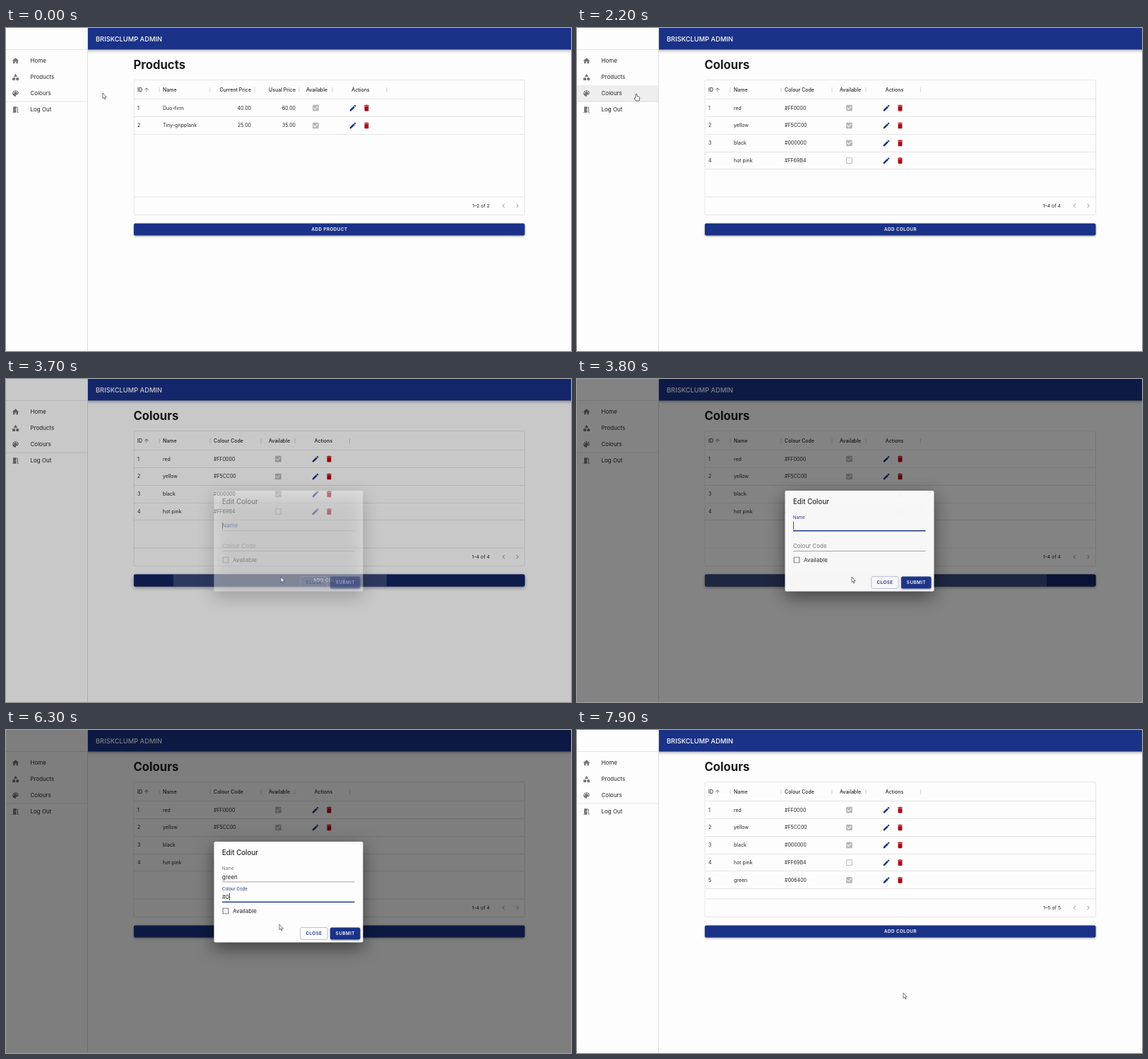
Recreate the animation shown at these times as an HTML page with a canvas. Size 800x457 px, loop 8 s.

```html
<!DOCTYPE html>
<html lang="en">
<head>
<meta charset="utf-8">
<title>Admin panel</title>
<style>
html, body { margin: 0; width: 100%; height: 100%; overflow: hidden; background: #fdfdfe; }
canvas { display: block; }
</style>
</head>
<body>
<canvas id="stage" width="800" height="457"></canvas>
<script>
const ctx = document.getElementById('stage').getContext('2d');
const LOOP = 8000;
const PAPER = '#fdfdfe', BLUE = '#1a3287', NAVY = '#12235f', RED = '#b3000f', INK = '#262626', GREY = '#747474';

const icons = Object.fromEntries(Object.entries({
  home: 'M10 20v-6h4v6h5v-8h3L12 3 2 12h3v8z',
  shapes: 'M12 2l-5.5 9h11zM3 13.5h8v8H3zM17.5 13a4.5 4.5 0 1 0 .01 0z',
  palette: 'M12 3a9 9 0 0 0 0 18c1.4 0 2-1.4 1.1-2.5-.8-1 0-2.5 1.1-2.5H16a5 5 0 0 0 5-5c0-4.4-4-8-9-8z' +
    'M6.5 9a1.5 1.5 0 1 0 .01 0zM9.5 5a1.5 1.5 0 1 0 .01 0zM14.5 5a1.5 1.5 0 1 0 .01 0zM17.5 9a1.5 1.5 0 1 0 .01 0z',
  door: 'M14 6v15H3v-2h2V3h9v1h5v15h2v2h-4V6zM10 11v2h2v-2z',
  edit: 'M3 17.25V21h3.75L17.81 9.94l-3.75-3.75zM20.71 7.04a1 1 0 0 0 0-1.41l-2.34-2.34a1 1 0 0 0-1.41 0l-1.83 1.83 3.75 3.75z',
  bin: 'M6 19a2 2 0 0 0 2 2h8a2 2 0 0 0 2-2V7H6zM19 4h-3.5l-1-1h-5l-1 1H5v2h14z',
  checked: 'M19 3H5a2 2 0 0 0-2 2v14a2 2 0 0 0 2 2h14a2 2 0 0 0 2-2V5a2 2 0 0 0-2-2zM10 17l-5-5 1.4-1.4 3.6 3.6 7.6-7.6L19 8z',
  unchecked: 'M19 3H5a2 2 0 0 0-2 2v14a2 2 0 0 0 2 2h14a2 2 0 0 0 2-2V5a2 2 0 0 0-2-2zM5 5h14v14H5z',
  up: 'M4 12l1.4 1.4L11 7.8V20h2V7.8l5.6 5.6L20 12l-8-8z',
  left: 'M15.4 7.4L14 6l-6 6 6 6 1.4-1.4-4.6-4.6z',
  right: 'M10 6L8.6 7.4l4.6 4.6-4.6 4.6L10 18l6-6z'
}).map(([name, d]) => [name, new Path2D(d)]));

const arrowPath = new Path2D('M0 0V7.6L1.8 6.1 3 8.8 4.2 8.3 3 5.7H5.3z');
const handPath = new Path2D('M-1 .8Q0-.6 1 .8V3.6L4 4.4Q5 4.7 4.8 6L4.2 8.4V10H-.6L-2.6 7Q-3.2 5.4-1 6z');

const pages = {
  products: {
    title: 'Products', button: 'ADD PRODUCT', ticks: [217, 289, 352, 415, 462, 539],
    heads: [['Current Price', 347, 'right'], ['Usual Price', 410, 'right'], ['Available', 440, 'center'], ['Actions', 502, 'center']],
    cells: [[347, 'right'], [410, 'right']], check: 438.5,
    rows: [['Duo-firm', '40.00', '60.00', true], ['Tiny-gripplank', '25.00', '35.00', true]]
  },
  colours: {
    title: 'Colours', button: 'ADD COLOUR', ticks: [217, 289, 361, 409, 486.5],
    heads: [['Colour Code', 294, 'left'], ['Available', 387, 'center'], ['Actions', 449.5, 'center']],
    cells: [[294, 'left']], check: 385.5,
    rows: [['red', '#FF0000', true], ['yellow', '#F5CC00', true], ['black', '#000000', true],
      ['hot pink', '#FF69B4', false], ['green', '#006400', true]]
  }
};

const cursorKeys = [
  [0, 137, 92], [900, 137, 92], [1200, 84, 93], [2450, 84, 93], [2800, 190, 160], [3250, 391, 280], [3600, 391, 280],
  [3720, 389, 280], [4300, 389, 280], [4500, 387, 275], [6550, 387, 275], [6900, 311, 255], [7050, 311, 255],
  [7400, 489, 285], [7600, 489, 285], [7880, 462, 372], [8000, 462, 372]
];
const nameKeys = [4650, 4800, 4950, 5080, 5230];
const codeKeys = Array.from({ length: 7 }, (_, i) => 6200 + i * 85);
const NAME_FOCUS = 3700, CODE_FOCUS = 5600, CHECK_CLICK = 7000;

const clamp = v => Math.max(0, Math.min(1, v));
const ease = v => v * v * (3 - 2 * v);
const span = (t, start, length) => ease(clamp((t - start) / length));
const mix = (a, b, k) => a + (b - a) * k;

function cursorAt(t) {
  const i = Math.max(1, cursorKeys.findIndex(k => k[0] > t));
  const [t0, x0, y0] = cursorKeys[i - 1], [t1, x1, y1] = cursorKeys[i];
  const k = ease(clamp((t - t0) / (t1 - t0)));
  return { x: mix(x0, x1, k), y: mix(y0, y1, k) };
}

function text(str, x, cy, size, { weight = 400, color = INK, align = 'left', spacing = 0 } = {}) {
  ctx.font = `${weight} ${size}px Inter, "Open Sans", sans-serif`;
  ctx.letterSpacing = spacing + 'px';
  ctx.textAlign = align;
  ctx.fillStyle = color;
  ctx.fillText(str, x, cy + size * 0.35);
}

function icon(name, cx, cy, color, size = 11.6) {
  ctx.save();
  ctx.translate(cx - size / 2, cy - size / 2);
  ctx.scale(size / 24, size / 24);
  ctx.fillStyle = color;
  ctx.fill(icons[name], 'evenodd');
  ctx.restore();
}

function rect(x, y, w, h, color) {
  ctx.fillStyle = color;
  ctx.fillRect(x, y, w, h);
}

function panel(x, y, w, h, { fill, stroke, shadow = 0, shade = 0.4, radius = 2 }) {
  ctx.save();
  ctx.beginPath();
  ctx.roundRect(x, y, w, h, radius);
  if (shadow) {
    ctx.shadowColor = `rgba(0,0,0,${shade})`;
    ctx.shadowBlur = shadow;
    ctx.shadowOffsetY = shadow / 3;
  }
  if (fill) { ctx.fillStyle = fill; ctx.fill(); }
  if (stroke) { ctx.strokeStyle = stroke; ctx.lineWidth = 0.8; ctx.stroke(); }
  ctx.restore();
}

function ripple(x, y, r, color, box) {
  ctx.save();
  ctx.beginPath();
  ctx.rect(...box);
  ctx.clip();
  ctx.beginPath();
  ctx.arc(x, y, r, 0, Math.PI * 2);
  ctx.fillStyle = color;
  ctx.fill();
  ctx.restore();
}

function button(label, x, y, w, h, hover) {
  panel(x, y, w, h, { fill: BLUE, shadow: 3 + hover * 2 });
  ctx.globalAlpha *= hover;
  panel(x, y, w, h, { fill: NAVY });
}

function buttonLabel(label, cx, cy, color = '#fff') {
  text(label, cx, cy, 6.3, { weight: 600, color, align: 'center', spacing: 0.45 });
}

function drawSidebar(t) {
  rect(0, 30, 115, 1, '#e4e4e6');
  rect(0, 103.5, 115, 1, '#e6e6e8');
  rect(115, 0, 1, 457, '#dedee0');
  const hover = span(t, 1030, 120) * (1 - span(t, 2530, 150));
  if (hover) rect(0, 81, 115, 23.5, `rgba(0,0,0,${0.06 * hover})`);
  if (t > 1580 && t < 2150) {
    const fade = 1 - span(t, 1800, 350);
    ripple(84, 93, mix(6, 118, span(t, 1580, 450)), `rgba(0,0,0,${0.1 * fade})`, [0, 81, 115, 23.5]);
  }
  [['home', 'Home', 46.5], ['shapes', 'Products', 69.5], ['palette', 'Colours', 92.5], ['door', 'Log Out', 115.5]]
    .forEach(([name, label, y]) => {
      icon(name, 13.5, y, GREY);
      text(label, 34.5, y, 8);
    });
}

function drawAppBar() {
  ctx.save();
  ctx.beginPath();
  ctx.rect(116, 0, 684, 40);
  ctx.clip();
  panel(105, -10, 710, 40.5, { fill: BLUE, shadow: 5, shade: 0.4, radius: 0 });
  ctx.restore();
  text('BRISKCLUMP ADMIN', 127, 15.5, 9.3, { weight: 500, color: '#fff' });
}

function drawTable(page, count) {
  const line = '#e4e4e6';
  text(page.title, 180.5, 52.3, 16.7, { weight: 700, color: '#1c1c1e' });
  panel(181, 73.5, 553.5, 191, { stroke: '#e0e0e2' });
  const head = (label, x, align) => text(label, x, 87.5, 7, { weight: 500, align });
  head('ID', 186, 'left');
  icon('up', 199, 87.3, '#6a6a6a', 8.6);
  head('Name', 222, 'left');
  page.heads.forEach(h => head(...h));
  page.ticks.forEach(x => rect(x - 0.5, 84, 1, 7, '#d4d4d6'));
  rect(181, 100, 553.5, 1, line);
  page.rows.slice(0, count).forEach((row, i) => {
    const y = 113.2 + i * 24.8;
    text(String(i + 1), 186, y, 7);
    text(row[0], 222, y, 7);
    page.cells.forEach(([x, align], c) => text(row[c + 1], x, y, 7, { align }));
    icon(row.at(-1) ? 'checked' : 'unchecked', page.check, y, '#b9b9bb');
    icon('edit', page.check + 52.7, y, BLUE);
    icon('bin', page.check + 72, y, RED);
    rect(181, Math.round(125 + i * 24.8), 553.5, 1, line);
  });
  rect(181, 238.5, 553.5, 1, line);
  text(`1–${count} of ${count}`, 685, 251.7, 6.8, { align: 'right' });
  icon('left', 704.5, 251.5, '#a8a8aa');
  icon('right', 724, 251.5, '#a8a8aa');
}

function drawAddButton(t, label) {
  const box = [181, 276.5, 553.5, 17];
  ctx.save();
  button(label, ...box, span(t, 3060, 200) * (1 - span(t, 3750, 250)));
  ctx.restore();
  if (t > 3580 && t < 4150) {
    const fade = 1 - span(t, 3850, 300);
    ripple(388, 280, Math.max(0, 24 + (t - 3600) * 1.26), `rgba(255,255,255,${0.17 * fade})`, box);
  }
  buttonLabel(label, 458, 285);
}

function drawField(t, label, value, lineY, focusAt, blurAt, keys) {
  const focused = t >= focusAt && t < blurAt;
  const lift = span(t, focusAt, focusAt === NAME_FOCUS ? 60 : 200);
  text(label, 306, lineY - mix(7.5, 18.8, lift), mix(8, 6, lift), { color: focused ? BLUE : '#757577' });
  const shown = value.slice(0, keys.filter(k => k <= t).length);
  text(shown, 306, lineY - 7.3, 8);
  const shownWidth = ctx.measureText(shown).width;
  rect(306, lineY - 0.5, 187.5, 0.8, '#8d8d8f');
  if (!focused) return;
  const half = 93.75 * span(t, focusAt, 100);
  rect(399.75 - half, lineY - 1, half * 2, 1.4, BLUE);
  const last = keys.reduce((a, k) => k <= t ? k : a, focusAt);
  if ((t - last) % 1060 < 530) rect(306 + shownWidth, lineY - 13, 0.8, 10.5, INK);
}

function drawDialog(t, alpha) {
  rect(0, 0, 800, 457, `rgba(0,0,0,${0.5 * alpha})`);
  ctx.save();
  ctx.globalAlpha = alpha;
  panel(294.5, 158, 211, 142.5, { fill: PAPER, shadow: 24, shade: 0.5 });
  text('Edit Colour', 306, 173.3, 9.7, { weight: 500 });
  drawField(t, 'Name', 'green', 215, NAME_FOCUS, CODE_FOCUS, nameKeys);
  drawField(t, 'Colour Code', '#006400', 243.7, CODE_FOCUS, CHECK_CLICK, codeKeys);
  if (t > CHECK_CLICK && t < 7400) {
    ripple(311, 256, 10 * span(t, CHECK_CLICK, 150), `rgba(26,50,135,${0.2 * (1 - span(t, 7100, 300))})`, [298, 244, 26, 26]);
  }
  const ticked = t >= CHECK_CLICK;
  icon(ticked ? 'checked' : 'unchecked', 311, 256, ticked ? BLUE : '#666');
  text('Available', 321, 256, 8);
  panel(416.8, 279.4, 38.4, 17, { stroke: '#a3adcf' });
  buttonLabel('CLOSE', 436, 288, BLUE);
  const submit = [459, 279.4, 42.5, 17];
  ctx.save();
  button('SUBMIT', ...submit, span(t, 7290, 180) * (1 - span(t, 7630, 150)));
  ctx.restore();
  if (t > 7550) ripple(489, 287, (t - 7550) * 0.25, 'rgba(255,255,255,.17)', submit);
  buttonLabel('SUBMIT', 480.5, 288);
  ctx.restore();
}

function drawCursor(t) {
  const { x, y } = cursorAt(t);
  const modal = t > 3650 && t < 7700;
  const over = (left, top, w, h) => x > left && x < left + w && y > top && y < top + h;
  const hand = modal
    ? over(305, 250, 12, 12) || over(459, 279, 42, 17)
    : over(0, 81, 115, 23) || over(181, 276, 554, 17);
  ctx.save();
  ctx.translate(x, y);
  ctx.lineJoin = 'round';
  ctx.lineWidth = hand ? 0.9 : 0.8;
  ctx.strokeStyle = '#555';
  ctx.fillStyle = '#fff';
  const path = hand ? handPath : arrowPath;
  ctx.fill(path);
  ctx.stroke(path);
  ctx.restore();
}

function draw(t) {
  const page = t < 1800 ? pages.products : pages.colours;
  const count = page === pages.products ? 2 : t < 7700 ? 4 : 5;
  rect(0, 0, 800, 457, PAPER);
  drawSidebar(t);
  drawAppBar();
  drawTable(page, count);
  drawAddButton(t, page.button);
  const modal = span(t, 3600, 225) * (1 - span(t, 7650, 195));
  if (modal > 0) drawDialog(t, modal);
  drawCursor(t);
}

function frame() {
  draw(performance.now() % LOOP);
  requestAnimationFrame(frame);
}
frame();
</script>
</body>
</html>
```
